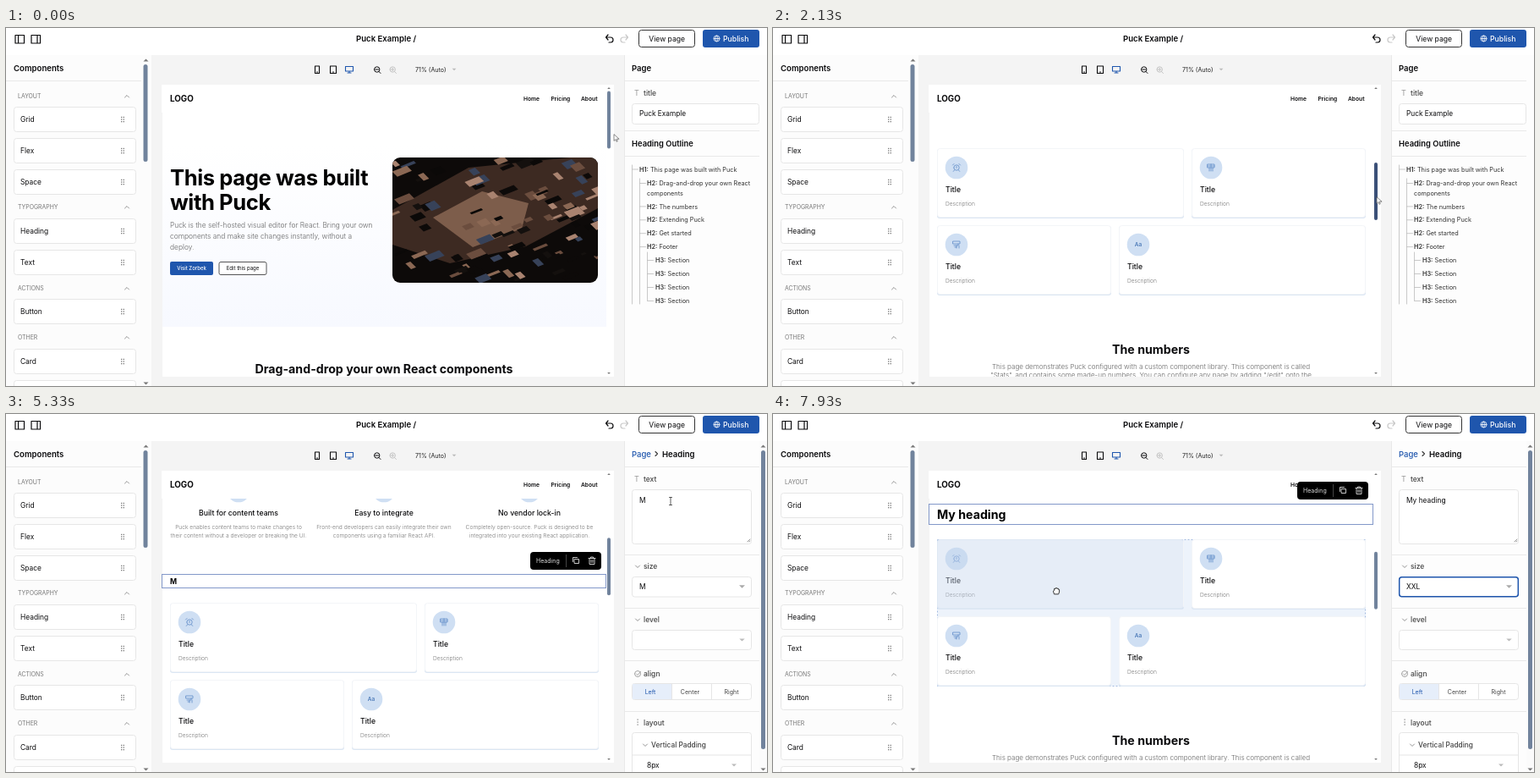
Recreate the animation shown at these times as an HTML page. Size 900x423 px, loop 8000 ms.

```html
<!DOCTYPE html>
<html lang="en">
<head>
<meta charset="utf-8">
<title>Page editor</title>
<style>
html, body { margin: 0; width: 100%; height: 100%; overflow: hidden; background: #fff; }
svg { display: block; width: 100vw; height: 100vh; font-family: Inter, Roboto, sans-serif; }
</style>
</head>
<body>
<svg id="stage" viewBox="0 0 900 423"></svg>
<script>
const LOOP = 8000;
const INK = '#0b0b0d', BLUE = '#1f56ad', PALE = '#cfdff3', LINE = '#e6e6e6', BAR = '#71839c';

// Markup helpers; text is placed by its left edge (or anchor) and vertical middle.
const text = (x, y, s, size, weight = 400, fill = INK, more = '') =>
  `<text x="${x}" y="${(y + size * 0.36).toFixed(2)}" font-size="${size}" font-weight="${weight}" fill="${fill}" ${more}>${s}</text>`;
const mid = (x, y, s, size, weight, fill) => text(x, y, s, size, weight, fill, 'text-anchor="middle"');
const rect = (x, y, w, h, fill, more = '') =>
  `<rect x="${x}" y="${y}" width="${w}" height="${h}" fill="${fill}" ${more}/>`;
const box = (x, y, w, h, r = 3, stroke = LINE, fill = '#fff') =>
  rect(x + 0.5, y + 0.5, w - 1, h - 1, fill, `rx="${r}" stroke="${stroke}"`);
const path = (d, stroke = INK, w = 1, fill = 'none') =>
  `<path d="${d}" fill="${fill}" stroke="${stroke}" stroke-width="${w}" stroke-linecap="round" stroke-linejoin="round"/>`;
const at = (x, y, body) => `<g transform="translate(${x} ${y})">${body}</g>`;
const group = (id, body) => `<g id="${id}">${body}</g>`;
const tri = (x, y, r, up, fill = '#777') =>
  `<path d="M${x - r} ${y + (up ? r : -r) / 2}h${2 * r}l${-r} ${up ? -r : r}z" fill="${fill}"/>`;
const chevron = (x, y, up, color = '#888') => path(`M${x - 2.5} ${y + (up ? 1 : -1)}l2.5 ${up ? -2.5 : 2.5}l2.5 ${up ? 2.5 : -2.5}`, color, 0.9);
const grip = (x, y) => [0, 1, 2, 3, 4, 5].map(i =>
  rect(x - 2 + (i % 2) * 2.6, y - 3.2 + (i >> 1) * 2.6, 1.3, 1.3, '#777')).join('');
const rule = y => rect(731, y, 160, 1, '#e9e9e9');

const ICONS = {
  pen: 'M-4 -4l5 1.5l2 4l-2 2l-4 -2zM-4 -4l4 4M2 4l2 -2',
  nodes: 'M-3 -4v4h5v2M-4.5 -4h3v2h-3zM0.5 2h3v2.5h-3z',
  alarm: 'M-3.2 0a3.2 3.2 0 1 0 6.4 0a3.2 3.2 0 1 0 -6.4 0M0 -1.5v2M-4.5 -3l1.5 -1.5M4.5 -3l-1.5 -1.5M-2.5 3l-1.2 1.4M2.5 3l1.2 1.4',
  board: 'M-4 -4h8v4h-8zM0 -4v8M-2 0v4M2 0v4M-4 -2h8',
  brush: 'M-4 -4h8v3h-8zM-3 1h5v-2M0 1v3M3 1v3M-2 3h2'
};
const badge = (x, y, icon) => `<circle cx="${x}" cy="${y}" r="13.3" fill="${PALE}"/>` +
  (icon === 'dot' ? `<circle cx="${x}" cy="${y}" r="4" fill="#5f8bc7"/>` :
   icon === 'Aa' ? mid(x, y, 'Aa', 6.5, 600, '#4f7cb9') : at(x, y, path(ICONS[icon], '#5f8bc7', 0.8)));

function leftPanel() {
  let s = rect(0, 32, 172, 391, '#fcfcfc') + text(9, 47.5, 'Components', 9.6, 600) + rect(0, 62, 160, 1, '#e9e9e9');
  const heads = [['LAYOUT', 81], ['TYPOGRAPHY', 212], ['ACTIONS', 308], ['OTHER', 366]];
  const items = [['Grid', 108], ['Flex', 145], ['Space', 182], ['Heading', 240], ['Text', 277], ['Button', 335], ['Card', 394], ['', 431]];
  for (const [name, y] of heads) s += text(14, y, name, 6.9, 400, '#777') + chevron(143, y, true);
  for (const [name, y] of items) s += box(9, y - 15, 145, 30) + text(17, y + 0.3, name, 8.4) + grip(138, y);
  return s + rect(162.5, 43, 5, 115, BAR, 'rx="2.5"') + tri(165.5, 38, 3, true) + tri(165.5, 420, 3, false);
}

function topBar() {
  const pane = (x, bar) => path(`M${x} 8.5h10.5v9.5h-10.5zM${x + bar} 8.5v9.5`, INK, 1.2);
  return rect(0, 0, 900, 32, '#fff') + pane(11, 3.5) + pane(30, 7) +
    text(414, 12.5, 'Puck Example /', 9.6, 600) +
    path('M712 8l-2.5 3l2.5 3M710 11h5a3 3 0 0 1 0 6h-2', INK, 1.2) +
    path('M733 8l2.5 3l-2.5 3M735 11h-5a3 3 0 0 0 0 6h2', '#c9c9c9', 1.2) +
    box(748, 2, 67, 21, 3, '#333') + mid(781.7, 12.5, 'View page', 8.6) +
    rect(824, 2, 67, 21, BLUE, 'rx="3"') + text(848, 12.5, 'Publish', 8.7, 500, '#fff') +
    path('M837 12.5a3.5 3.5 0 1 0 7 0a3.5 3.5 0 1 0 -7 0h7M840.5 9q-3 3.5 0 7q3 -3.5 0 -7', '#fff', 0.8);
}

function viewTools() {
  const lens = (x, color, plus) => path(`M${x - 3.5} 49a3.2 3.2 0 1 0 6.4 0a3.2 3.2 0 1 0 -6.4 0M${x + 2} 51.5l2 2M${x - 2} 49h3.4` + (plus ? `M${x - 0.3} 47.3v3.4` : ''), color);
  return rect(172, 32, 559, 391, '#f4f4f4') +
    path('M365.5 45h5v8.5h-5zM367.5 52h1', INK, 1.1) + path('M383.5 45h7v8.5h-7zM386.5 52h1', INK, 1.1) +
    path('M401.5 45.5h9v5.5h-9zM406 51v2M404 53h4', BLUE, 1.1) + lens(439, INK) + lens(457.5, '#c4c4c4', true) +
    text(484, 49.3, '71% (Auto)', 7.1, 400, '#222') + tri(530, 49, 2.4, false, '#bbb') +
    rect(185, 67, 534, 345, '#fff');
}

function photo() {
  let seed = 11, s = rect(457, 153, 243, 148, '#0d0a09');
  const rnd = () => (seed = (seed * 16807) % 2147483647) / 2147483647;
  const tones = ['#8b6854', '#0b0908', '#a98370', '#0d0a09', '#374259', '#6b4d3e', '#14100e'];
  s += path('M457 215l90 -50l120 -12h33v60l-85 45l-90 20l-68 -22z', 'none', 0, '#3d2a22') +
    path('M505 224l58 -31l55 14l-8 30l-58 22z', 'none', 0, '#7d5d4b');
  for (let i = 0; i < 98; i++) {
    const x = 455 + rnd() * 240, y = 156 + rnd() * 142, w = 5 + rnd() * 13, h = 2 + rnd() * 6;
    s += path(`M${x} ${y}l${w} ${-w * 0.4}l${h} ${h}l${-w} ${w * 0.4}z`, 'none', 0, tones[i % tones.length]);
  }
  return `<g clip-path="url(#photo)">${s}</g>`;
}

function hero() {
  const p = ['Puck is the self-hosted visual editor for React. Bring your own', 'components and make site changes instantly, without a', 'deploy.'];
  const title = (y, s) => text(194, y, s, 25.6, 700, '#000', 'letter-spacing="-0.4"');
  return rect(185, 68, 534, 285, 'url(#sky)') + title(177, 'This page was built') + title(206, 'with Puck') +
    p.map((l, i) => text(194, 233 + i * 13.2, l, 8.4, 300, '#666')).join('') +
    rect(194, 276, 51, 16, BLUE, 'rx="2"') + mid(219.5, 284, 'Visit Zorbek', 6, 500, '#fff') +
    box(251.5, 276, 57, 16, 2, '#555') + mid(280, 284, 'Edit this page', 6, 400) + photo();
}

function features() {
  const cols = [
    [275, 'pen', 'Built for content teams', 'Puck enables content teams to make changes to', 'their content without a developer or breaking the UI.'],
    [447, 'nodes', 'Easy to integrate', 'Front-end developers can easily integrate their own', 'components using a familiar React API.'],
    [619, 'dot', 'No vendor lock-in', 'Completely open-source. Puck is designed to be', 'integrated into your existing React application.']];
  return mid(447, 403, 'Drag-and-drop your own React components', 14.2, 700) +
    mid(447, 420, 'Configure Puck with your own components to make change for your marketing pages without a developer.', 8.06, 300, '#666') +
    group('zone', rect(194.5, 438, 506, 76, '#eef3fb', 'stroke="#8fabd8" stroke-dasharray="2 2"')) +
    cols.map(([x, icon, title, a, b]) => badge(x, 456, icon) + mid(x, 482, title, 8.7, 500) +
      mid(x, 499, a, 6.67, 300, '#777') + mid(x, 509, b, 6.67, 300, '#777')).join('');
}

function cards() {
  const card = (x, w, y, icon) => rect(x, y - 22, w, 82, '#dbe6f3', 'rx="3"') + box(x, y - 23, w, 82, 3, '#f3f5f8') +
    badge(x + 23, y, icon) + text(x + 10, y + 25.7, 'Title', 8.7, 500) + text(x + 10, y + 43, 'Description', 6.6, 300, '#777');
  return group('grid', rect(194.5, 571.5, 506, 173, '#edf3fb', 'stroke="#a3bbe0" stroke-dasharray="2 2"')) +
    card(194, 292, 594, 'alarm') + card(495, 206, 594, 'board') + card(194, 206, 685, 'brush') + card(409, 292, 685, 'Aa') +
    group('hover', rect(194, 571, 291, 82, '#c3d5ec', 'opacity="0.42"')) +
    mid(447, 809, 'The numbers', 14.2, 700) +
    mid(447, 829.5, 'This page demonstrates Puck configured with a custom component library. This component is called', 8.06, 300, '#666') +
    mid(447, 839.5, '"Stats", and contains some made-up numbers. You can configure any page by adding "/edit" onto the', 8.06, 300, '#666');
}

function canvas() {
  const guide = x => path(`M${x} 100V411`, '#7f97c4', 0.9).replace('/>', ' stroke-dasharray="2 2.5"/>');
  return `<g clip-path="url(#frame)">` +
    group('scroll', hero() + features() + group('push', cards()) +
      group('gap', rect(184, 554, 526, 21, PALE)) +
      group('block', rect(184.5, 554.5, 525, 16, '#fff', 'id="blockBox" stroke="#8398c9"') + '<text id="blockText" x="194" font-weight="700"/>')) +
    rect(184, 66, 526, 34, '#fff') + text(194, 83.5, 'LOGO', 9.8, 700) +
    text(612, 83.5, 'Home', 6.7, 600) + text(644.5, 83.5, 'Pricing', 6.7, 600) + text(680, 83.5, 'About', 6.7, 600) +
    group('guides', guide(184.7) + guide(709.5)) +
    group('drag', rect(0, 0, 526, 21, '#fff') + path('M0 0H526M0 20.5H526', '#8ba6d2', 0.9) + text(6, 10.5, 'Heading', 5.8, 500) + grip(516, 10.5)) +
    rect(710, 66, 9, 346, '#fff') + tri(713, 71, 1.8, true) + tri(713, 408, 1.8, false) +
    rect(711, 74.5, 4, 68, BAR, 'id="thumb" rx="2"') + '</g>' +
    group('tools', rect(620, 0, 84, 21, '#000', 'rx="4"') + text(627, 10.5, 'Heading', 7, 400, '#ddd') + rect(662, 3, 0.8, 15, '#555') +
      path('M672.5 8.5h5v5h-5zM670.5 11.5v-5h5M689 7.5h8M691.5 7.5v-1.5h3v1.5M690 7.5v7h6v-7M692 9.5v3M694 9.5v3', '#ddd', 0.9));
}

function pagePanel() {
  const rows = ['Drag-and-drop your own React', 'The numbers', 'Extending Puck', 'Get started', 'Footer'];
  const item = (x, y, tag, s) => text(x, y, `<tspan font-weight="600">${tag}:</tspan> ${s}`, 7.3, 400, '#333');
  const tick = (x, y) => `M${x} ${y}h7`;
  let ticks = 'M740.5 162V326M749.5 178V326M758.5 265V322' + tick(740.5, 167);
  let s = text(740, 47.5, 'Page', 9.5, 600) + rule(62) + text(743, 77, 'T', 9, 400, '#999') + text(754, 77, 'title', 8.5, 500, '#444') +
    box(740, 89, 151, 25) + text(749, 101.5, 'Puck Example', 8.3) + rule(121) +
    text(740, 136.5, 'Heading Outline', 9.4, 600) + rule(151) + item(749, 167.5, 'H1', 'This page was built with Puck');
  rows.forEach((r, i) => {
    const y = i ? 195 + i * 15.9 : 183.5;
    s += item(758, y, 'H2', r);
    ticks += tick(749.5, y);
  });
  s += text(758, 195, 'components', 7.3, 400, '#333');
  for (let i = 0; i < 4; i++) {
    s += item(768, 274.5 + i * 16, 'H3', 'Section');
    ticks += tick(758.5, 274.5 + i * 16);
  }
  return s + path(ticks, '#bbb', 0.8);
}

const SIZES = ['XXXL', 'XXL', 'XL', 'L', 'M', 'S', 'XS'];
const ROW = 14.6, LIST_TOP = 216.8;

function headingPanel() {
  const label = (y, s) => text(754, y, s, 8.5, 500, '#444');
  const options = SIZES.map((s, i) => rect(741, LIST_TOP + i * ROW, 140, ROW, '#2b62d6', `id="row${i}"`) +
    text(750, LIST_TOP + (i + 0.5) * ROW, s, 8.4, 400, INK, `id="opt${i}"`)).join('');
  return text(740, 47.5, 'Page', 9.5, 500, BLUE) + path('M768 44.5l2.5 2.5l-2.5 2.5', '#333', 1.1) + text(776, 47.5, 'Heading', 9.5, 600) + rule(62) +
    text(743, 77, 'T', 9, 400, '#999') + label(77, 'text') + box(740, 89, 142, 65) +
    rect(748.5, 95.5, 35, 12, '#b7d2fb', 'id="marked"') + text(749, 101.5, '', 8.4, 400, INK, 'id="field"') +
    path('M877 151l3 -3M879 151l1 -1', '#777', 0.8) + rule(166) +
    chevron(747, 180, false) + label(180, 'size') + box(740, 192, 142, 24.5) +
    rect(740.7, 192.7, 140.6, 23, 'none', `id="focus" rx="3" stroke="${BLUE}" stroke-width="1.5"`) +
    text(749, 204.3, 'M', 8.4, 400, INK, 'id="size"') + tri(870.5, 204, 3.5, false, '#aaa') + rule(229) +
    chevron(747, 243, false) + label(243, 'level') + box(740, 255, 142, 24) + tri(870.5, 267, 3.2, false, '#bbb') + rule(291) +
    path('M743.5 307a3.5 3.5 0 1 0 7 0a3.5 3.5 0 1 0 -7 0M745.5 307l1.5 1.5l3.5 -4', '#999', 0.9) + label(306.5, 'align') +
    box(740, 318, 142, 20) + rect(741, 319, 46, 18, '#e6eefa') + rect(787, 319, 1, 18, LINE) + rect(834, 319, 1, 18, LINE) +
    mid(762, 328, 'Left', 7, 400, BLUE) + mid(809, 328, 'Center', 7, 400, '#444') + mid(858, 328, 'Right', 7, 400, '#444') + rule(351) +
    [0, 1, 2].map(i => rect(746.5, 360.5 + i * 3, 1.2, 1.2, '#777')).join('') + label(364.5, 'layout') +
    box(740, 376, 142, 60) + chevron(756, 391, false) + text(763, 391, 'Vertical Padding', 8.3, 500, '#444') +
    rect(741, 402.5, 140, 1, LINE) + text(758, 415, '8px', 8.4) + tri(861, 415, 3, false, '#bbb') +
    rect(891, 32, 9, 391, '#fbfbfb') + rect(893, 43, 5, 353, BAR, 'rx="2.5"') + tri(895.5, 38, 3, true) + tri(895.5, 420, 3, false) +
    group('list', box(740, 216, 142, 104, 0, '#8ba0c4', '#f6f9ff') + tri(870.5, 204, 3.5, false, '#1c3f7c') + options);
}

const stage = document.getElementById('stage');
stage.innerHTML = `<defs>
  <clipPath id="frame"><rect x="184" y="67" width="535" height="345"/></clipPath>
  <clipPath id="photo"><rect x="457" y="153" width="243" height="148" rx="9"/></clipPath>
  <linearGradient id="sky" x2="0" y2="1"><stop offset="0.25" stop-color="#fff"/><stop offset="1" stop-color="#f7f9ff"/></linearGradient>
</defs>` + rect(0, 0, 900, 423, '#fff') + viewTools() + canvas() + leftPanel() +
  rect(731, 32, 169, 391, '#fdfdfd') + rect(731, 32, 1, 391, '#e9e9e9') + group('page', pagePanel()) + group('heading', headingPanel()) + topBar() +
  group('ghost', box(0, 0, 145, 30) + text(8, 15, 'Heading', 8.4) + grip(129, 15)) +
  group('arrow', path('M0 0v7.4l1.8 -1.7l1.3 2.6l1.2 -0.6l-1.2 -2.5h2.6z', '#555', 0.7, '#fff')) +
  group('beam', path('M-1.5 -4.5h3M0 -4.5v9M-1.5 4.5h3', '#333', 0.8)) +
  group('hand', path('M-2.6 3.5l-1 -3.3l1.2 -0.6v-2.2h1.6v-0.7h1.7v0.6h1.6v1h1.1v2.7l-0.8 2.5z', '#222', 0.9, '#fff'));

const $ = {};
stage.querySelectorAll('[id]').forEach(el => $[el.id] = el);
const show = (id, on) => $[id].setAttribute('visibility', on ? 'visible' : 'hidden');
const move = (id, x, y) => $[id].setAttribute('transform', `translate(${x} ${y})`);
const within = (t, a, b) => t >= a && t < b;

// Keys are [time, ...values], eased between neighbours.
function track(keys, t) {
  let i = 0;
  while (i < keys.length - 2 && t >= keys[i + 1][0]) i++;
  const [t0, ...a] = keys[i], [t1, ...b] = keys[i + 1];
  const u = Math.min(1, Math.max(0, (t - t0) / (t1 - t0))), e = u * u * (3 - 2 * u);
  return a.map((v, k) => v + (b[k] - v) * e);
}

const POINTER = [[0, 719, 126], [700, 714, 116], [855, 714, 116], [2000, 714, 200], [2180, 714, 200], [2640, 70, 241], [2720, 70, 241],
  [2930, 187, 205], [3350, 440, 196], [3700, 457, 199], [4250, 457, 199], [4850, 786, 103], [6150, 786, 103], [6420, 812, 205],
  [6550, 812, 205], [6800, 808, 261.5], [6900, 808, 261.5], [7080, 800, 240], [7200, 800, 240], [7500, 420, 215], [7850, 335, 209]];
const SCROLL = [[855, 0], [2000, 429], [3100, 429], [3700, 365], [7350, 365], [7780, 448]];
const PUSH = [[2880, 0], [3030, 21], [4200, 21], [4300, 17], [7150, 17], [7190, 25]];
const DRAG_RIGHT = [[2880, 445], [2930, 476], [3350, 710]];
const LIFT = 2720, ENTER = 2880, DROP = 4200, TYPE = 5300, OPEN = 6450, PICK = 7150, HOVER = 7870;

function render(t) {
  const [x, y] = track(POINTER, t), [scroll] = track(SCROLL, t), [push] = track(PUSH, t);
  const dragging = within(t, ENTER, DROP), dropped = t >= DROP, big = t >= PICK;

  move('scroll', 0, -scroll);
  move('push', 0, push);
  $.thumb.setAttribute('y', 74.5 + scroll / 5.08);
  $.thumb.setAttribute('fill', within(t, 700, 2200) ? '#3b5078' : BAR);

  for (const id of ['zone', 'guides', 'gap', 'drag']) show(id, dragging);
  move('drag', track(DRAG_RIGHT, t)[0] - 526, y - 11 + (y > 199 ? -1 : 1));
  show('ghost', within(t, LIFT, ENTER));
  move('ghost', x - 61, y - 16);

  const typed = t < TYPE ? 'Heading' : 'My heading'.slice(0, 1 + Math.floor((t - TYPE) / 88));
  const font = big ? 14.2 : 8.66, height = dropped ? push : 17;
  show('block', dropped);
  $.blockBox.setAttribute('height', height - 1);
  $.blockText.setAttribute('font-size', font);
  $.blockText.setAttribute('y', 554 + height / 2 + font * 0.36);
  $.blockText.textContent = typed;
  show('tools', dropped);
  move('tools', 0, 528 - scroll);

  show('page', !dropped);
  show('heading', dropped);
  $.field.textContent = typed;
  show('marked', within(t, 5050, TYPE));
  show('focus', t >= OPEN);
  $.size.textContent = big ? 'XXL' : 'M';
  const open = within(t, OPEN, PICK);
  const row = y < LIST_TOP ? 4 : Math.floor((y - LIST_TOP) / ROW);
  show('list', open);
  SIZES.forEach((_, i) => {
    show('row' + i, open && i === row);
    $['opt' + i].setAttribute('fill', i === row ? '#fff' : INK);
  });

  show('grid', t >= HOVER);
  show('hover', t >= HOVER);
  const hand = within(t, 2600, 3350) || t >= HOVER, beam = within(t, 4780, 6230);
  show('hand', hand);
  show('beam', beam);
  show('arrow', !hand && !beam);
  for (const id of ['hand', 'beam', 'arrow']) move(id, x, y);
}

function tick() {
  render(performance.now() % LOOP);
  requestAnimationFrame(tick);
}
tick();
</script>
</body>
</html>
```
